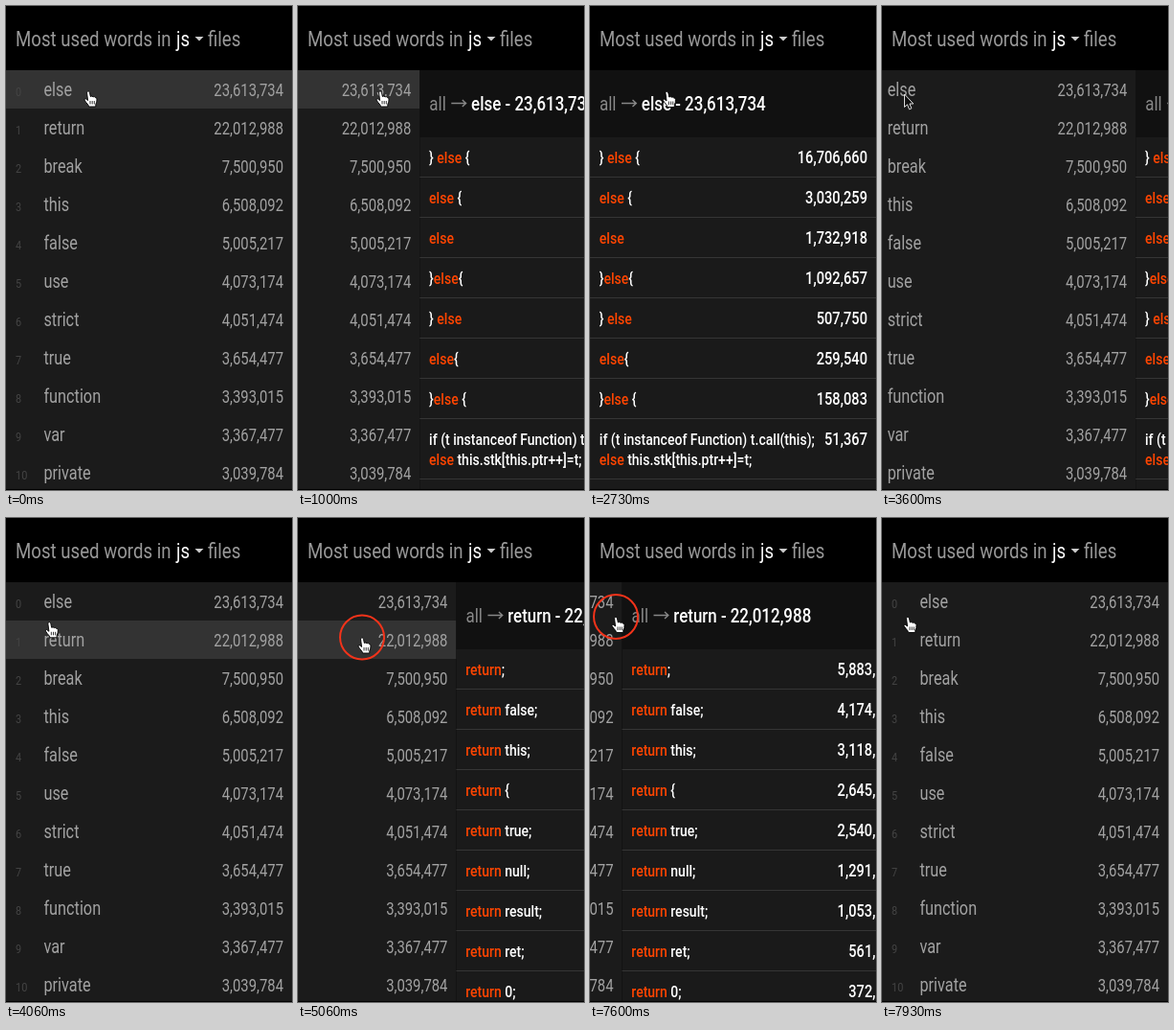
These frames come from a looping animation (299 px wide and 505 px high, 8860 ms). An HTML page:

```html
<!DOCTYPE html>
<html lang="en">
<head>
<meta charset="utf-8">
<title>Most used words</title>
<style>
html, body { margin: 0; width: 100%; height: 100%; overflow: hidden; background: #000; }
svg { display: block; width: 100vw; height: 100vh; }
text { font-family: Roboto, "Open Sans", sans-serif; white-space: pre; }
#detail text { font-weight: 500; }
#detail .dim { font-weight: 400; }
.key { fill: #ff4500; }
</style>
</head>
<body>
<svg id="stage" viewBox="0 0 299 505"></svg>
<script>
const W = 299, LOOP = 8860, CONDENSE = 0.84;

const words = [
  ["else", "23,613,734"], ["return", "22,012,988"], ["break", "7,500,950"],
  ["this", "6,508,092"], ["false", "5,005,217"], ["use", "4,073,174"],
  ["strict", "4,051,474"], ["true", "3,654,477"], ["function", "3,393,015"],
  ["var", "3,367,477"], ["private", "3,039,784"]
];
const elseLines = [
  ["} else {", "16,706,660"], ["else {", "3,030,259"], ["else", "1,732,918"],
  ["}else{", "1,092,657"], ["} else", "507,750"], ["else{", "259,540"],
  ["}else {", "158,083"],
  ["if (t instanceof Function) t.call(this);\nelse this.stk[this.ptr++]=t;", "51,367"]
];
const returnLines = [
  ["return;", "5,883,110"], ["return false;", "4,174,830"], ["return this;", "3,118,233"],
  ["return {", "2,645,288"], ["return true;", "2,540,799"], ["return null;", "1,291,750"],
  ["return result;", "1,053,598"], ["return ret;", "561,894"], ["return 0;", "372,021"]
];

const rect = (y, h, fill, more = "") =>
  `<rect y="${y}" width="${W}" height="${h}" fill="${fill}" ${more}/>`;

// One condensed text style for the whole page
const label = (x, y, size, fill, str, anchor = "start", cls = "") =>
  `<text class="${cls}" transform="translate(${x} ${y}) scale(${CONDENSE} 1)" font-size="${size}" fill="${fill}" text-anchor="${anchor}">${str}</text>`;

const listPanel = () => rect(67, 440, "#1b1b1b") +
  rect(67, 40, "#333", 'id="hover"') +
  words.map(([word, count], i) => {
    const y = 94 + 40 * i;
    return label(10, y, 13, "#444", i) +
      label(39.4, y, 19.4, "#a2a2a2", word) +
      label(290, y, 17.7, "#a2a2a2", count, "end");
  }).join("");

function detailPanel(id, word, total, lines) {
  let y = 137;
  let out = rect(67, 440, "#1a1a1a") + rect(67, 70, "#111") +
    label(10, 108.5, 20.2, "#888", "all", "start", "dim") +
    '<path d="M33 101.5H48M44.5 98L48.3 101.5L44.5 105" fill="none" stroke="#888" stroke-width="1.4"/>' +
    label(53.8, 108.5, 20.2, "#fff", `${word} - ${total}`);
  for (const [code, count] of lines) {
    const rows = code.split("\n");
    rows.forEach((row, i) => {
      const marked = row.replace(word, `<tspan class="key">${word}</tspan>`);
      out += label(9.8, y + 26.5 + 21 * i, 16.7, "#fff", marked);
    });
    out += label(290, y + 26.5, 17.5, "#fff", count, "end");
    y += 21 + 21 * rows.length;
    out += rect(y - 1, 1, "#353535");
  }
  return `<g id="${id}">${out}</g>`;
}

const header = rect(0, 67, "#000") +
  label(10, 41.5, 22.2, "#999", "Most used words in") +
  label(178, 41.5, 22.2, "#fff", "js") +
  '<path d="M197.5 32H206.5L202 36.5Z" fill="#ccc"/>' +
  label(211, 41.5, 22.2, "#999", "files");

const pointer = `<g id="pointer">
  <circle id="ring" r="23" fill="none" stroke="#f2331a" stroke-width="2"/>
  <g id="hand">
    <path d="M-1.5 1.6Q-1 0 .3 .4Q1.3 .8 1.5 2L2.3 6Q4 5 5 6.3Q6.6 5.6 7.3 7Q8.8 6.7 9 8.5Q9.2 12 7.8 14V16.5H.5L0 14.8Q-2.5 12 -4 9.6Q-4.2 8 -2.8 8.2L-.4 10Z" fill="#fff" stroke="#000" stroke-width=".9"/>
    <path d="M2 10.5V14M4.2 10.5V14M6.3 10.5V14" stroke="#000" stroke-width=".8"/>
  </g>
  <path id="arrow" d="M0 0V13.5L3 10.8L5 15.8L7.4 14.8L5.4 10H9.3Z" fill="#111" stroke="#ddd"/>
</g>`;

document.getElementById("stage").innerHTML =
  `<g id="list">${listPanel()}</g><g id="detail">` +
  detailPanel("elseView", "else", "23,613,734", elseLines) +
  detailPanel("returnView", "return", "22,012,988", returnLines) +
  `</g>${header}${rect(504, 1, "#000")}${pointer}`;

const $ = id => document.getElementById(id);
const show = (id, on) => $(id).setAttribute("display", on ? "inline" : "none");
const move = (id, x, y = 0) => $(id).setAttribute("transform", `translate(${x.toFixed(2)} ${y.toFixed(2)})`);
const clamp = u => Math.max(0, Math.min(1, u));
const within = (t, spans) => spans.some(([a, b]) => t >= a && t < b);

// cubic-bezier(.25, .1, .25, 1)
function ease(x) {
  const curve = (s, a, b) => 3 * a * s * (1 - s) ** 2 + 3 * b * s * s * (1 - s) + s ** 3;
  let lo = 0, hi = 1;
  for (let i = 0; i < 24; i++) {
    const mid = (lo + hi) / 2;
    if (curve(mid, 0.25, 0.25) < x) lo = mid; else hi = mid;
  }
  return curve(lo, 0.1, 1);
}

const SLIDE = 370;
const slides = [[878, 1], [3378, -1], [4962, 1], [7560, -1]];
const clicks = [[600, 980], [3070, 3450], [4660, 5090], [7460, 7690]];
const arrows = [[2780, 3010], [3500, 3740], [6590, 6930]];
const track = [
  [0, 86, 88.5], [2655, 86, 88.5], [3070, 23, 94], [3378, 23, 94], [3580, 23.5, 92],
  [3660, 23.5, 92], [4460, 67, 124.5], [6530, 67, 124.5], [6990, 19, 95],
  [7400, 27, 103], [LOOP, 27, 103]
];

function pointerAt(t) {
  const i = track.findIndex(p => p[0] > t);
  const [t0, x0, y0] = track[i - 1], [t1, x1, y1] = track[i];
  const u = (t - t0) / (t1 - t0), k = u * u * (3 - 2 * u);
  return [x0 + (x1 - x0) * k, y0 + (y1 - y0) * k];
}

function render(t) {
  const open = slides.reduce((sum, [start, dir]) =>
    sum + dir * ease(clamp((t - start) / SLIDE)), 0);
  const x = W * (1 - clamp(open));
  move("list", x - W);
  move("detail", x);
  show("elseView", t < 4300);
  show("returnView", t >= 4300);

  const [px, py] = pointerAt(t);
  move("pointer", px, py);
  const arrow = within(t, arrows);
  show("arrow", arrow);
  show("hand", !arrow);
  show("ring", within(t, clicks));

  show("hover", within(t, [[0, 1300], [3740, 5340]]));
  $("hover").setAttribute("y", t > 3740 && py >= 107 ? 107 : 67);
}

const begin = performance.now();
function tick() {
  render((performance.now() - begin) % LOOP);
  requestAnimationFrame(tick);
}
tick();
</script>
</body>
</html>
```
